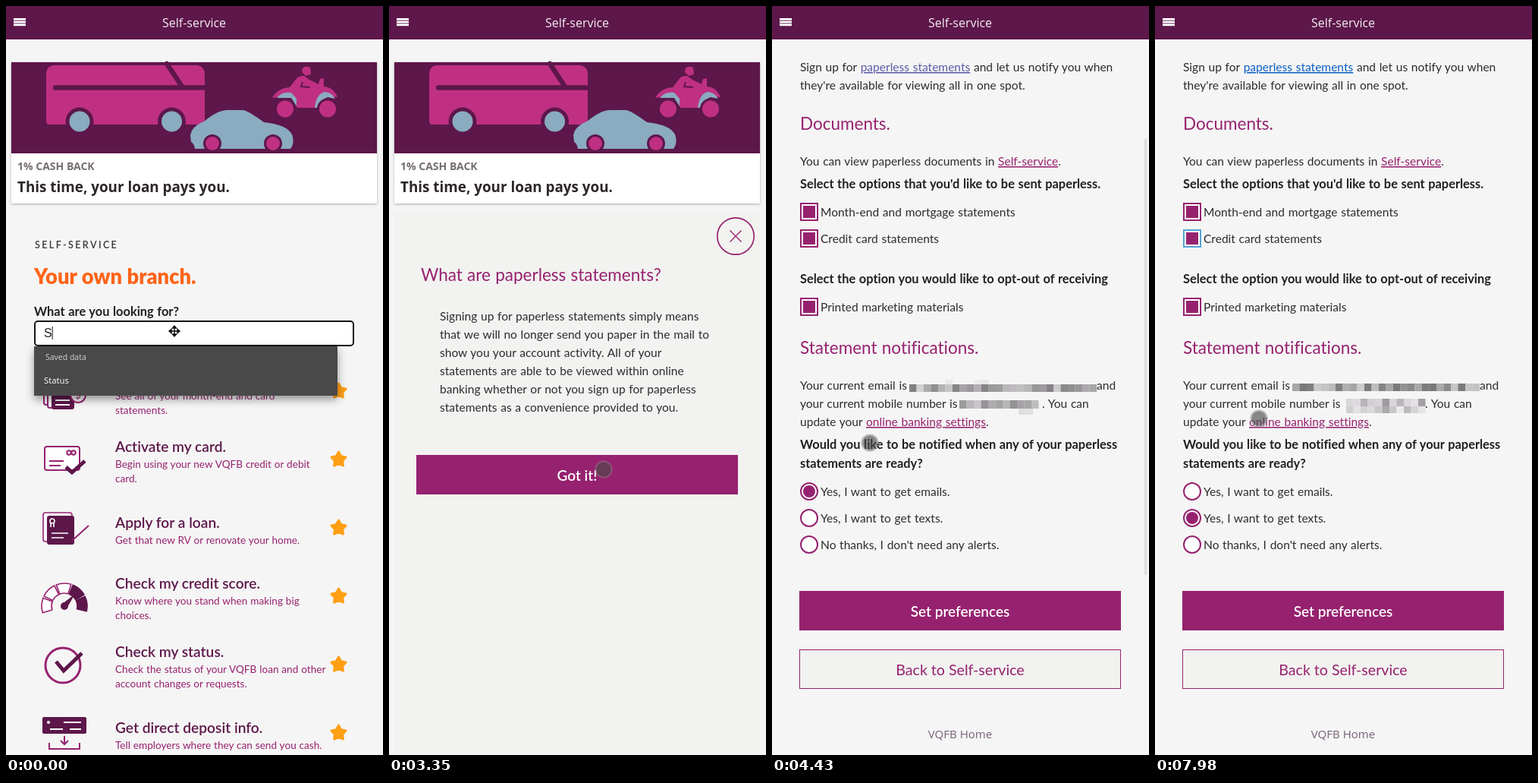
Animation of 497 by 986 pixels, one loop 8 s. Source, as an HTML page:

```html
<!DOCTYPE html>
<html lang="en">
<head>
<meta charset="utf-8">
<title>Self-service</title>
<style>
html, body { margin: 0; height: 100%; overflow: hidden; background: #f5f5f5; }
svg { display: block; width: 100vw; height: 100vh; font-family: Lato, sans-serif; font-variant-ligatures: none; }
text { white-space: pre; }
.ui { font-family: "Open Sans", sans-serif; }
.mid { text-anchor: middle; }
.body { font-size: 15.55px; word-spacing: .7px; fill: #2f2b2d; }
.strong { font-size: 16.4px; font-weight: 700; word-spacing: .6px; fill: #231f20; }
.hero { font-size: 27.3px; font-weight: 900; fill: #ff6418; }
.head { font-size: 22.5px; word-spacing: .5px; fill: #96226f; }
.title { font-size: 19.2px; font-weight: 600; fill: #5d174a; }
.desc { font-size: 13.6px; word-spacing: .4px; fill: #96226f; }
.button { font-size: 19px; font-weight: 600; fill: #fff; }
.link { fill: #96226f; text-decoration: underline 1px; text-underline-offset: 2px; }
.line { fill: none; stroke: #96226f; stroke-width: 2; }
.dark { fill: #5d174a; }
.tick { fill: none; stroke: #5d174a; stroke-width: 5; }
</style>
</head>
<body>
<svg id="stage" viewBox="0 0 497 986"></svg>
<script>
const PLUM = '#5d174a', BERRY = '#96226f', PINK = '#bf3083', BLUE = '#8aabc0', FOCUS = '#56a3d6';
const LOOP = 8000, MAX_SCROLL = 296;

const text = (x, y, cls, str, attrs = '') => `<text x="${x}" y="${y}" class="${cls}" ${attrs}>${str}</text>`;
const rect = (x, y, w, h, fill, attrs = '') => `<rect x="${x}" y="${y}" width="${w}" height="${h}" fill="${fill}" ${attrs}/>`;
const circle = (x, y, r, fill, attrs = '') => `<circle cx="${x}" cy="${y}" r="${r}" fill="${fill}" ${attrs}/>`;
const path = (d, attrs) => `<path d="${d}" ${attrs}/>`;
const group = (id, content, attrs = '') => `<g id="${id}" ${attrs}>${content}</g>`;
const link = (str, id = '') => `<tspan class="link" id="${id}">${str}</tspan>`;
const noise = n => { const v = Math.sin(n * 127.1 + 3.7) * 43758.5453; return v - Math.floor(v); };
const polar = (r, deg) => `${77 + r * Math.cos(deg * Math.PI / 180)} ${13 - r * Math.sin(deg * Math.PI / 180)}`;

// Promotional card
const wheel = (x, y, r, fill, rim) => circle(x, y, rim, PLUM) + circle(x, y, r, fill);
const banner =
  rect(7, 74, 482, 186, '#fff', 'filter="url(#soft)"') + rect(7, 74, 482, 120, PLUM) +
  path('M53 90Q53 78 65 78H250Q262 78 262 90V156H57Q53 156 53 151Z', `fill="${PINK}"`) +
  path('M65 107.5H262M212 76L232 106', `fill="none" stroke="${PLUM}" stroke-width="6.5" stroke-linecap="round"`) +
  wheel(97, 152, 13.5, BLUE, 18.5) + wheel(218.5, 152, 13.5, BLUE, 18.5) +
  path('M243 170Q245 158 261 152Q279 137 292 137H312Q318 137 340 153Q370 156 377 169Q381 180 375 188H249Q248 181 244 179Z', `fill="${BLUE}"`) +
  wheel(272, 181, 9, PINK, 12) + wheel(352, 181, 9, PINK, 12) +
  path('M351 121Q358 108 374 107L381 98Q385 91 393 92L400 97L412 103L414 96L419 95V106Q432 107 437 120L418 118L407 134H384L376 117Z', `fill="${PINK}"`) +
  path('M391 100L389 106L401 107', `fill="none" stroke="${PLUM}" stroke-width="2"`) +
  path('M391 82Q395 78 401 81L402 90L395 92L390 87Z', `fill="${PINK}"`) +
  path('M357 121Q364 112 376 114L383 122V132L376 121ZM407 134Q409 116 420 113Q430 114 434 122L424 120Q415 122 414 134Z', `fill="${BLUE}"`) +
  wheel(368, 135.5, 11, PINK, 14) + wheel(424, 135.5, 11, PINK, 14) +
  text(15, 216, 'ui', '1% CASH BACK', 'font-size="14" font-weight="700" fill="#766e72"') +
  text(15, 245, 'ui', 'This time, your loan pays you.', 'font-size="18.85" font-weight="700" fill="#2c262a"');

// List icons, drawn around y = 0
const gauge = [0, 1, 2, 3, 4].map(i => {
  const from = 197 - i * 43, to = from - 38;
  return path(`M${polar(30, from)}A30 30 0 0 1 ${polar(30, to)}L${polar(17, to)}A17 17 0 0 0 ${polar(17, from)}Z`,
    `fill="${i > 2 ? PLUM : '#fff'}" stroke="${i > 2 ? PLUM : BERRY}" stroke-width="1.6" stroke-linejoin="round"`);
}).join('');
const icons = {
  docs: rect(50, -22, 30, 40, 'none', 'class="line" rx="3"') + rect(55, -18, 30, 40, '#f5f5f5', `rx="3" stroke="${BERRY}" stroke-width="2"`) +
    rect(60, -14, 30, 38, PLUM, 'rx="3"') + path('M65 12H84M65 18H84', 'stroke="#fff" stroke-width="2"') +
    circle(95, 5, 10, '#f5f5f5', `stroke="${BERRY}" stroke-width="2"`) + text(95, 10, 'desc mid', '$'),
  card: rect(51, -17, 46, 31, '#fff', `rx="3" stroke="${BERRY}" stroke-width="2"`) +
    path('M57 2H76M57 8H72', 'class="line"') + circle(83, -9, 2.7, 'none', 'class="line"') + circle(89, -9, 2.7, 'none', 'class="line"') +
    path('M79 10L87 17L104 2', 'class="tick"'),
  loan: rect(49, -20, 38, 38, '#fff', `rx="3" stroke="${BERRY}" stroke-width="1.6"`) + rect(54, -16, 36, 38, PLUM, 'rx="3"') +
    circle(61, -9, 3, 'none', 'stroke="#fff" stroke-width="1.6"') + path('M59 -6V-1M63 -6V-1M60 7H82M60 13H76', 'stroke="#fff" stroke-width="1.6"') +
    path('M88 16L109 -3', 'class="line"'),
  gauge: gauge + path('M73 11L91 -3L80 16Z', 'class="dark"') + circle(77, 13, 5, PLUM),
  check: circle(75, 1, 23, 'none', `stroke="${BERRY}" stroke-width="3"`) + path('M66 -4L76 8L100 -15', 'class="tick"'),
  deposit: rect(48, -21, 58, 22, PLUM, 'rx="2"') + path('M58 -5H75M84 -5H99M76 -14H99', 'stroke="#fff" stroke-width="2"') +
    circle(56, -14, 2, '#fff') + path('M77 4V14M72 10L77 15L82 10M57 13V21H97V13', 'class="line"'),
  leaf: rect(53, -21, 36, 42, '#fff', `rx="3" stroke="${BERRY}" stroke-width="2"`) + path('M59 -12H81M59 -5H76M59 2H68', 'class="line"') +
    path('M75 17Q73 -2 101 0Q101 20 79 17L73 24', 'class="dark"')
};
const items = {
  access: ['docs', 'Access my statements.', 'See all of your month-end and card', 'statements.'],
  activate: ['card', 'Activate my card.', 'Begin using your new VQFB credit or debit', 'card.'],
  apply: ['loan', 'Apply for a loan.', 'Get that new RV or renovate your home.'],
  score: ['gauge', 'Check my credit score.', 'Know where you stand when making big', 'choices.'],
  status: ['check', 'Check my status.', 'Check the status of your VQFB loan and other', 'account changes or requests.'],
  deposit: ['deposit', 'Get direct deposit info.', 'Tell employers where they can send you cash.'],
  paperless: ['leaf', 'Sign up for paperless.', 'Change your statement settings.']
};
const star = path('M' + Array.from({ length: 10 }, (_, i) => {
  const r = i % 2 ? 5.4 : 10, a = i * Math.PI / 5;
  return `${438.5 + r * Math.sin(a)} ${-r * Math.cos(a)}`;
}).join('L') + 'Z', 'fill="#ff9f14" stroke="#ff9f14" stroke-width="3" stroke-linejoin="round"');
const listMarkup = keys => keys.split(' ').map((key, i) => {
  const [icon, title, ...lines] = items[key], top = lines.length > 1 ? -10 : 0;
  return `<g transform="translate(0 ${507 + 90 * i})">${icons[icon]}${star}${text(144, top, 'title', title)}` +
    lines.map((line, n) => text(144, top + 21 + 19 * n, 'desc', line)).join('') + '</g>';
}).join('');

// [start, typed text, matching items]
const typing = [
  [0, 'S', 'access activate apply score status deposit'],
  [330, 'St', 'access activate score status paperless'],
  [460, 'Sta', 'access score status paperless'],
  [590, 'Stat', 'access status paperless'],
  [790, 'State', 'access paperless'],
  [920, 'Statem', 'access paperless'],
  [1050, 'Stateme', 'access paperless']
];
const search =
  text(38, 319, '', 'SELF-SERVICE', 'font-size="12.5" font-weight="600" letter-spacing="2.4" fill="#3a3437"') +
  text(37, 366, 'hero', 'Your own branch.') +
  text(37, 408, 'strong', 'What are you looking for?') +
  rect(38, 415, 420, 32, '#fff', 'rx="4" stroke="#161616" stroke-width="2"') +
  text(50, 436, '', '', 'id="query" font-size="16" font-family="Liberation Sans, Arial, sans-serif" fill="#222"') +
  rect(60, 422, 1, 17, '#111', 'id="caret"') + group('list', '') +
  group('dropdown', rect(37, 448, 400, 65, '#4a4a4a', 'filter="url(#deep)"') +
    text(52, 466, 'ui', 'Saved data', 'font-size="10.5" fill="#d4d4d4"') +
    text(50, 497, 'ui', 'Status', 'font-size="11.3" fill="#fff"'));

// Settings page, placed as seen when fully scrolled
const blocks = (seed, x, y, count, h, shade, spread, skip = 0) => Array.from({ length: count }, (_, i) => {
  const v = Math.round(shade + spread * noise(seed + y + i * 7));
  return noise(seed + x + y * 3 + i) < skip ? '' : rect(x + i * 9.5, y, 9.6, h, `rgb(${v},${v - 2},${v})`);
}).join('');
const mosaicBefore = blocks(5, 181, 492, 26, 6, 230, 10, .85) + blocks(5, 181, 498, 26, 10, 125, 85) +
  blocks(5, 247, 519, 11, 11, 140, 70) + blocks(5, 325, 530, 2, 8, 225, 10);
const mosaicAfter = blocks(31, 181, 497, 26, 10, 120, 85) +
  blocks(31, 252, 517, 11, 10, 150, 85) + blocks(31, 252, 527, 11, 9, 160, 80);

const checkbox = (id, y, label) => rect(38, y - 11, 22, 22, '#fff', `id="${id}Ring" stroke="${BERRY}" stroke-width="2"`) +
  rect(41, y - 8, 16, 16, BERRY, `id="${id}Mark"`) + text(64, y + 6, 'body', label);
const radio = (id, y, label) => circle(49, y, 11, '#fff', `id="${id}Ring" stroke="${BERRY}" stroke-width="2"`) +
  circle(49, y, 8, BERRY, `id="${id}Mark"`) + text(64, y + 6, 'body', label);
const settings =
  text(37, -7, 'body', 'Change statement settings') + text(37, 40, 'hero', 'Save the trees.') +
  text(37, 86, 'body', `Sign up for ${link('paperless statements', 'paperlessLink')} and let us notify you when`) +
  text(37, 110, 'body', "they're available for viewing all in one spot.") +
  text(37, 163, 'head', 'Documents.') +
  text(37, 210, 'body', `You can view paperless documents in ${link('Self-service')}.`) +
  text(37, 240, 'strong', "Select the options that you'd like to be sent paperless.") +
  checkbox('month', 271, 'Month-end and mortgage statements') +
  checkbox('credit', 306, 'Credit card statements') +
  text(37, 365, 'strong', 'Select the option you would like to opt-out of receiving') +
  checkbox('print', 396, 'Printed marketing materials') +
  text(37, 458, 'head', 'Statement notifications.') +
  text(37, 505, 'body', 'Your current email is') + text(428, 505, 'body', 'and') +
  text(37, 529, 'body', 'your current mobile number is') + text(356, 529, 'body', '. You can') +
  text(37, 553, 'body', `update your ${link('online banking settings')}.`) +
  group('mosaicA', mosaicBefore) + group('mosaicB', mosaicAfter) +
  text(37, 583, 'strong', 'Would you like to be notified when any of your paperless') +
  text(37, 608, 'strong', 'statements are ready?') +
  radio('emails', 639, 'Yes, I want to get emails.') + radio('texts', 674, 'Yes, I want to get texts.') +
  radio('none', 709, "No thanks, I don't need any alerts.") +
  rect(36, 770, 424, 52, BERRY) + text(248, 804, 'button mid', 'Set preferences') +
  rect(36.5, 847.5, 423, 51, '#f2f2f0', `stroke="${BERRY}"`) +
  text(248, 881, 'mid', 'Back to Self-service', `font-size="19.6" fill="${BERRY}"`) +
  text(248, 964, 'ui mid', 'VQFB Home', 'font-size="15" fill="#776277"');

const explanation = ['Signing up for paperless statements simply means', 'that we will no longer send you paper in the mail to',
  'show you your account activity. All of your', 'statements are able to be viewed within online',
  'banking whether or not you sign up for paperless', 'statements as a convenience provided to you.'];
const modal = rect(7, 271, 482, 760, '#f2f2f0') +
  circle(457, 303, 24.2, 'none', 'class="line" style="stroke-width:1.7"') +
  path('M449.5 295.5L464.5 310.5M464.5 295.5L449.5 310.5', 'class="line" style="stroke-width:1.4"') +
  text(42, 362, 'head', 'What are paperless statements?') +
  explanation.map((line, i) => text(67, 414 + 24 * i, 'body', line)).join('') +
  rect(36, 591, 424, 52, BERRY) + text(248, 625, 'button mid', 'Got it!');

const header = rect(0, 0, 497, 44, PLUM) + [16, 19.7, 23.4].map(y => rect(10, y, 16, 2.8, '#fff')).join('') +
  text(248, 28, 'ui mid', 'Self-service', 'font-size="16" fill="#f4ecf2"');
const arrows = [0, 90, 180, 270].map(a => path('M0 0V-4M-2.5 -4L0 -7L2.5 -4Z', `transform="rotate(${a})" fill="#111" stroke="#111" stroke-width="1.4"`)).join('');

document.getElementById('stage').innerHTML =
  `<defs><filter id="soft" x="-5%" y="-5%" width="110%" height="115%"><feDropShadow dx="0" dy="1" stdDeviation="1.5" flood-opacity=".3"/></filter>
  <filter id="deep" x="-10%" y="-20%" width="120%" height="170%"><feDropShadow dx="0" dy="5" stdDeviation="6" flood-opacity=".4"/></filter></defs>` +
  rect(0, 0, 497, 986, '#f5f5f5') + group('search', search) + group('settings', settings) +
  group('banner', banner) + group('modal', modal) + header +
  rect(491, 0, 3.2, 574, '#cfcfcf', 'id="scrollbar" rx="1"') +
  group('move', arrows, 'transform="translate(222 428)"') +
  group('dot', circle(0, 0, 11.6, 'rgba(128,128,128,.5)') + circle(0, 0, 9.6, 'rgba(0,0,0,.27)'));

const el = Object.fromEntries([...document.querySelectorAll('[id]')].map(node => [node.id, node]));
const fade = (node, value) => {
  node.setAttribute('opacity', value);
  node.style.display = value > 0 ? '' : 'none';
};
const shift = (node, x, y) => node.setAttribute('transform', `translate(${x} ${y})`);
const linear = u => u, easeOut = u => 1 - (1 - u) ** 2;

// Keys are [time, ...values]
function track(t, keys, ease = linear) {
  if (t <= keys[0][0]) return keys[0].slice(1);
  const i = keys.findIndex(key => key[0] > t);
  if (i < 0) return keys[keys.length - 1].slice(1);
  const a = keys[i - 1], b = keys[i], u = ease((t - a[0]) / (b[0] - a[0]));
  return a.slice(1).map((v, n) => v + (b[n + 1] - v) * u);
}
const pointer = [[1100, 222, 428], [1530, 250, 600], [2080, 250, 600], [2400, 190, 376], [2670, 190, 376], [3010, 283, 610],
  [3400, 283, 610], [3630, 175, 477], [3965, 175, 477], [4430, 129, 575], [4640, 129, 575], [4900, 139, 674], [5240, 139, 674],
  [5515, 133, 389], [5595, 133, 389], [5950, 120, 304], [6270, 120, 304], [6500, 118, 271], [7100, 124, 271], [7300, 118, 307],
  [7640, 118, 307], [7975, 137, 543]];
const scrolling = [[3780, 0], [3895, 114], [3965, 114], [4120, 270], [4250, MAX_SCROLL]];

let shownList = '';
function draw(t) {
  const [, typed, matches] = typing.filter(step => step[0] <= t).pop();
  if (matches !== shownList) el.list.innerHTML = listMarkup(shownList = matches);
  el.query.textContent = typed;
  el.caret.setAttribute('x', 50 + el.query.getComputedTextLength());
  fade(el.dropdown, t < 790 ? 1 : 0);
  fade(el.search, track(t, [[1590, 1], [1800, 0]])[0]);

  const [scroll] = track(t, scrolling);
  const [enter] = track(t, [[2110, 0], [2410, 1]], easeOut);
  shift(el.banner, 0, -scroll);
  shift(el.settings, 0, MAX_SCROLL - scroll + 40 * (1 - enter));
  fade(el.settings, enter);
  const [open] = track(t, [[2680, 0], [3010, 1], [3400, 1], [3630, 0]]);
  shift(el.modal, 0, 24 * (1 - open));
  fade(el.modal, open);
  el.scrollbar.setAttribute('y', 2.6 + .582 * scroll);
  fade(el.scrollbar, track(t, [[3780, 0], [3850, 1], [4350, 1], [4570, 0]])[0]);

  const textsChosen = t >= 4960;
  const marks = {
    month: t < 6640 || t >= 6900, credit: t < 6090 || t >= 7360, print: true,
    emails: !textsChosen, texts: textsChosen, none: false
  };
  const focus = t < 4960 ? '' : t < 6000 ? 'texts' : t < 6570 ? 'credit' : t < 7290 ? 'month' : 'credit';
  for (const id in marks) {
    fade(el[id + 'Mark'], marks[id] ? 1 : 0);
    el[id + 'Ring'].setAttribute('stroke', id === focus ? FOCUS : BERRY);
  }
  el.paperlessLink.style.fill = textsChosen ? '#0b5fc4' : '#5c5ba6';
  fade(el.mosaicA, t < 6400 ? 1 : 0);
  fade(el.mosaicB, t < 6400 ? 0 : 1);

  fade(el.move, t < 1100 ? 1 : 0);
  fade(el.dot, t < 1100 ? 0 : 1);
  shift(el.dot, ...track(t, pointer, easeOut));
}

const start = performance.now();
function tick() {
  draw((performance.now() - start) % LOOP);
  requestAnimationFrame(tick);
}
tick();
</script>
</body>
</html>
```
